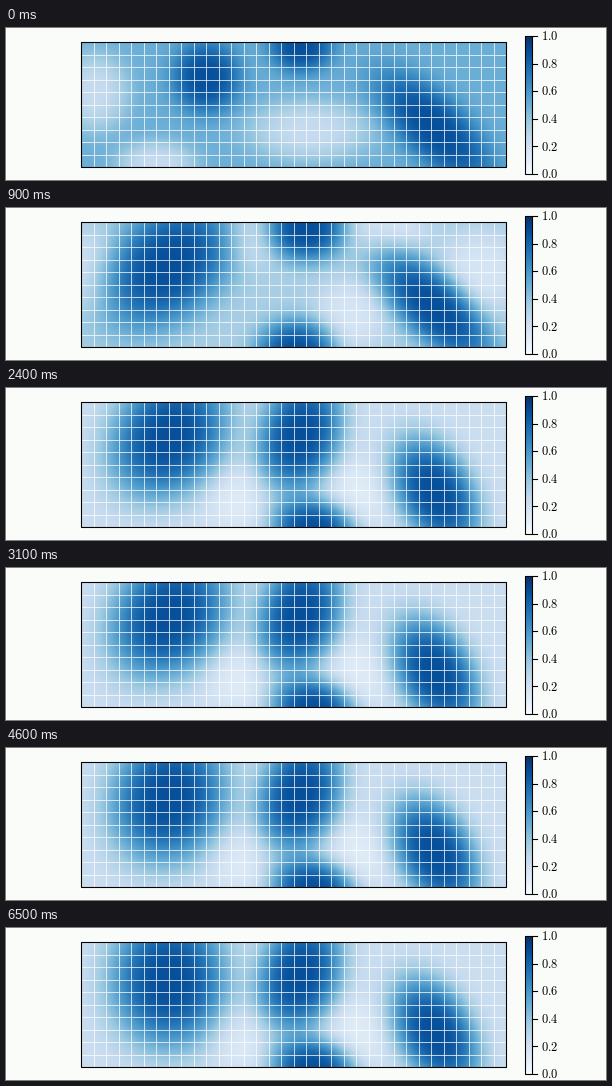
These frames come from a looping animation (600 by 152 pixels, 6.6 s). A matplotlib script:

```python
import numpy as np
import matplotlib.pyplot as plt
from matplotlib.animation import FuncAnimation
from matplotlib.patches import Rectangle

W, H, DPI = 600, 152, 100
FRAMES, STEP = 66, 100
PX = 72 / DPI
COLS, ROWS, CELL = 34, 10, 12.5
LEFT, TOP = 75, 14
RIGHT, BOTTOM = LEFT + COLS * CELL, TOP + ROWS * CELL
BAR_L, BAR_R, BAR_T, BAR_B = 519, 526, 8, 146
PEAK, DIP = .88, .5

plt.rcParams["mathtext.fontset"] = "cm"

u, v = np.meshgrid(np.linspace(0, COLS, COLS * 12), np.linspace(0, ROWS, ROWS * 12))


def spot(cx, cy, rx, ry, lean=0):
    """Flat-topped bump in cell units; lean shears it sideways."""
    dx, dy = u - cx, v - cy
    r2 = ((dx + lean * dy) / rx) ** 2 + (dy / ry) ** 2
    return np.exp(-r2 ** 1.5)


def union(spots):
    return 1 - np.prod([1 - s for s in spots], axis=0)


def scene(base, dark, light):
    ground = base * (1 - DIP * union(light))
    return ground + (PEAK - ground) * union(dark)


west = spot(7, 2.7, 4.8, 5.2, .2)
west_final = spot(7, 3, 4.8, 5.7)
east = spot(28.3, 6.9, 3.4, 4.6, -.7)
east_late = spot(28.4, 7.3, 3.3, 4.6, -.3)
north, south = spot(18, .5, 3.2, 2.7), spot(17.2, 10.6, 3.2, 2.8)
centre, south_late = spot(17.5, 2.6, 3.4, 4.8, .15), spot(18.6, 10.3, 3.4, 2.7, -.2)
edge, hollow = spot(1, 4, 2.8, 3.2), spot(21.5, 7.5, 2.9, 3)
late_dips = [spot(13.2, 7.5, 3.4, 2.6), hollow]

start = scene(.5, [spot(10, 2.8, 2.8, 3), spot(17.6, .3, 2.6, 2.2), east],
              [edge, spot(18.3, 7.1, 5, 2.5), spot(6, 9.8, 3.2, 1.9)])
spread = scene(.34, [spot(6.9, 3.4, 5, 5.3, .35), north, south, east],
               [edge, hollow, spot(13.4, 1, 2.5, 2.6),
                spot(24.3, .5, 3.5, 2.2), spot(32, 4, 3.4, 3.4)])
split = scene(.25, [west, north, south, east], late_dips)
merged = scene(.22, [west, centre, south_late, east_late], late_dips)
settled = scene(.22, [west_final, centre, south_late, east_late], late_dips)

KEYS = [0, 900, 1700, 2400, 3800, 5300]
SCENES = [start, spread, split, merged, merged, settled]


def field(t):
    pos = np.interp(t, KEYS, range(len(KEYS)))
    i = min(int(pos), len(KEYS) - 2)
    return SCENES[i] + (pos - i) * (SCENES[i + 1] - SCENES[i])


fig = plt.figure(figsize=(W / DPI, H / DPI), dpi=DPI, facecolor="#fafcf9")
ax = fig.add_axes([0, 0, 1, 1])
ax.axis("off")

heat = ax.imshow(field(0), cmap="Blues", vmin=0, vmax=1, aspect="auto",
                 interpolation="bilinear", extent=(LEFT, RIGHT, BOTTOM, TOP))
ax.imshow(np.linspace(1, 0, 256)[:, None], cmap="Blues", aspect="auto",
          extent=(BAR_L, BAR_R, BAR_B, BAR_T))
ax.set_xlim(0, W)
ax.set_ylim(H, 0)

grid = dict(color="white", lw=.9 * PX, alpha=.8)
ax.vlines(LEFT + CELL * np.arange(1, COLS), TOP, BOTTOM, **grid)
ax.hlines(TOP + CELL * np.arange(1, ROWS), LEFT, RIGHT, **grid)


def frame_box(x0, y0, x1, y1):
    ax.add_patch(Rectangle((x0, y0), x1 - x0, y1 - y0, fill=False,
                           ec="black", lw=1.1 * PX, zorder=4))


frame_box(LEFT, TOP, RIGHT, BOTTOM)
frame_box(BAR_L, BAR_T, BAR_R, BAR_B)
for level in np.linspace(0, 1, 6):
    y = BAR_B + level * (BAR_T - BAR_B)
    ax.plot([BAR_R, BAR_R + 4.5], [y, y], color="black", lw=1.1 * PX)
    ax.text(535, y + 4.2, f"${level:.1f}$", fontsize=9, va="baseline")


def update(i):
    heat.set_data(field(i * STEP))
    return [heat]


anim = FuncAnimation(fig, update, frames=FRAMES, interval=STEP,
                     repeat=True, repeat_delay=0, blit=False)
plt.show()
```
